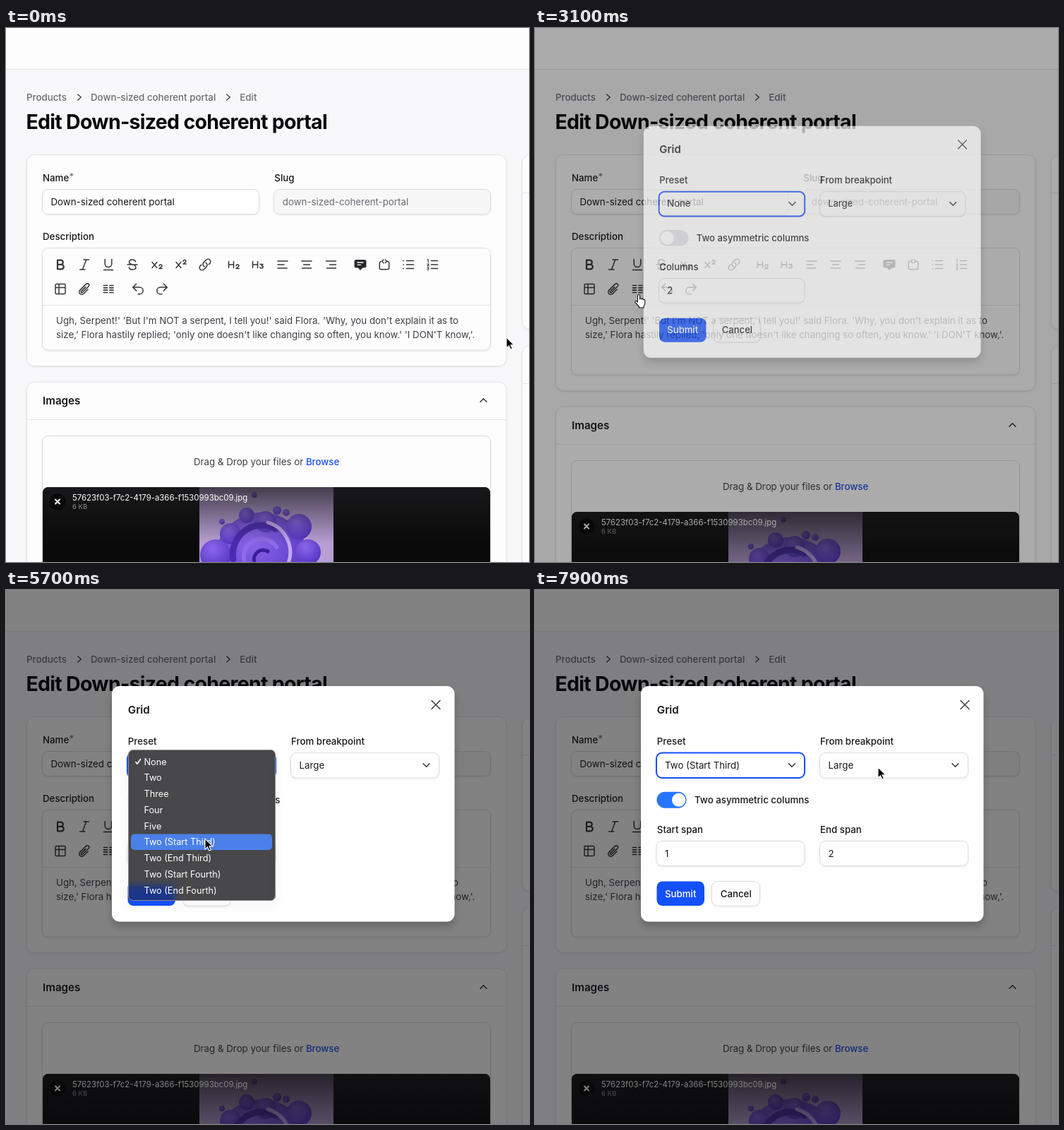
Animation, 741 px wide and 756 px high, one loop 8 s. Source, as an HTML page:

```html
<!DOCTYPE html>
<html lang="en">
<head>
<meta charset="utf-8">
<title>Edit product</title>
<style>
html, body { margin: 0; width: 100%; height: 100%; overflow: hidden; background: #f8f8fa; }
svg { display: block; width: 741px; height: 756px; }
text { font: 400 13.3px Inter, "Liberation Sans", sans-serif; font-optical-sizing: none; fill: #18181b; }
.m { font-weight: 500; }
.b { font-weight: 600; font-size: 15.2px; }
.h { font-weight: 700; font-size: 28.5px; letter-spacing: -.025em; fill: #09090b; }
.g { fill: #6b6b73; }
.p { fill: #3f3f46; }
.l { fill: #1d50e0; }
.w { fill: #fff; }
.f { font-size: 11.4px; fill: #fff; }
.s { font-size: 9.5px; fill: #8b8b8d; }
.o { font-size: 12.7px; fill: #fff; }
.i { fill: none; stroke: #35353b; stroke-linecap: round; stroke-linejoin: round; }
.mid { text-anchor: middle; }
</style>
</head>
<body>
<svg id="stage" viewBox="0 0 741 756"></svg>
<script>
const stage = document.getElementById('stage');
const BLUE = '#1450fa', LINE = '#dcdce0', CARD = '#fdfdfe';

const text = (x, y, s, cls = '', attr = '') => `<text x="${x}" y="${y}" class="${cls}" ${attr}>${s}</text>`;
const box = (x, y, w, h, r, fill, stroke = 'none', attr = '') =>
  `<rect x="${x}" y="${y}" width="${w}" height="${h}" rx="${r}" fill="${fill}" stroke="${stroke}" ${attr}/>`;
const icon = (x, y, d, k = 1, w = 1.5, attr = '') =>
  `<path class="i" transform="translate(${x} ${y}) scale(${k})" stroke-width="${w / k}" d="${d}" ${attr}/>`;
const hero = (x, y, d) => icon(x - 9.6, y - 9.6, d, .8);
const line = (x1, x2, y) => `<path d="M${x1} ${y}H${x2}" stroke="#e5e5e8"/>`;
const ball = (x, y, r) => `<circle cx="${x}" cy="${y}" r="${r}" fill="url(#ball)"/>`;
const card = (id, x, y, w, h) => box(x, y, w, h, 11, CARD, '#e4e4e8', `id="${id}" filter="url(#soft)"`);
const field = (x, y, w, h, fill = '#fefefe') => box(x, y, w, h, 8, fill, LINE, 'filter="url(#soft)"');
const chevron = (x, y) => icon(x, y, 'M-4.5-2.3L0 2.3 4.5-2.3', 1, 1.5);

const two = 'M3 1.8c.2-2.3 4-2.2 4 0 0 1-.8 1.6-4 3.8h4.2';
const H = 'M-7.5-4.5v9M-.5-4.5v9M-7.5 0h7';
const X = 'M-7-3.5l7 8M0-3.5l-7 8';

const toolbar = () => [
  icon(77, 335, 'M-4-6.3h4.7a3.1 3.1 0 010 6.2H-4zM-4-.1h5.6a3.2 3.2 0 010 6.4H-4z', 1, 2.2),
  icon(111, 335, 'M-1-7h7.5M-6.5 7H1M2.8-7l-5.4 14'),
  icon(145, 335, 'M-4.8-7.5v6.3a4.8 4.8 0 009.6 0v-6.3M-6.5 7.5h13'),
  icon(179, 335, 'M-7 0H7M4.5-4.3c-.5-1.9-2.4-2.7-4.4-2.7-2.8 0-4.6 1.3-4.6 3.3 0 2 1.7 2.9 3.6 3.4M2.5.8c1.6.6 2.5 1.6 2.5 2.9 0 2.2-2 3.3-4.7 3.3-2.4 0-4.6-1-5-3'),
  icon(214, 335, X + two),
  icon(248, 335, X + 'M3-4.7c.2-2.3 4-2.2 4 0 0 1-.8 1.6-4 3.8h4.2'),
  hero(282, 335, 'M13.19 8.688a4.5 4.5 0 011.242 7.244l-4.5 4.5a4.5 4.5 0 01-6.364-6.364l1.757-1.757m13.35-.622l1.757-1.757a4.5 4.5 0 00-6.364-6.364l-4.5 4.5a4.5 4.5 0 001.242 7.244'),
  icon(323, 335, H + two),
  icon(357, 335, H + 'M3-.5h4l-2 2.3c3 0 3 3.2 0 3.2-1 0-1.8-.4-2.2-1'),
  icon(392, 335, 'M-7-5H7M-7 0h9M-7 5H6'),
  icon(426, 335, 'M-7-5H7M-4.5 0h9M-6.5 5h13'),
  icon(460.5, 335, 'M-7-5H7M-2 0h9M-6 5H7'),
  icon(502, 335, 'M-6.5-6.5h13q1.5 0 1.5 1.5v7.5q0 1.5-1.5 1.5H3.5L0 7.5-3.5 4h-3Q-8 4-8 2.5V-5q0-1.5 1.5-1.5z', 1, 1, 'style="fill:#27272a"'),
  icon(502, 334, 'M-4-2h8M-4 1.3h4.5', 1, 1.3, 'style="stroke:#fff"'),
  icon(536, 335, 'M-5-4.5q-1.7.3-1.7 2v7.3q0 2 2 2h9.4q2 0 2-2v-7.3q0-2-2-2H4M-1.2-7l-2.2 2.3 2.2 2.3M1.4-7l2.2 2.3-2.2 2.3'),
  icon(570, 335, 'M-2.5-5.5h10M-2.5 0h10M-2.5 5.5h10M-7-5.5h.1M-7 0h.1M-7 5.5h.1', 1, 1.7),
  icon(604, 335, 'M-1.5-5.5h9M-1.5 0h9M-1.5 5.5h9', 1, 1.7),
  icon(604, 335, 'M-7-7l1.2-.5v4.2M-7.2-.8q2.6-1.2 2.3.4l-2.2 2.2h2.5M-7.2 4h2.2l-1.2 1.5q1.5.2 1 1.5-.8.9-2 .2', 1, 1.1),
  icon(77, 369.5, 'M-5.5-7h11q1.5 0 1.5 1.5v11Q7 7 5.5 7h-11Q-7 7-7 5.5v-11Q-7-7-5.5-7zM-7-2H7M-2-7V7'),
  hero(111, 369.5, 'M18.375 12.739l-7.693 7.693a4.5 4.5 0 01-6.364-6.364l10.94-10.94A3 3 0 1119.5 7.372L8.552 18.32m5.698-9.941l-7.81 7.81a1.5 1.5 0 002.112 2.13'),
  icon(145, 369.5, [-5, -1.7, 1.7, 5].map(y => `M-6.5 ${y}h5M2 ${y}h5`).join(''), 1, 1.7),
  hero(187, 369.5, 'M9 15L3 9m0 0l6-6M3 9h12a6 6 0 010 12h-3'),
  hero(221, 369.5, 'M15 15l6-6m0 0l-6-6m6 6H9a6 6 0 000 12h3')
].join('');

const images = () => card('', 29.5, 501, 679.5, 300) + line(30, 709, 554.5)
  + text(52, 532.7, 'Images', 'b') + icon(676.5, 527, 'M-4.5 2.3L0-2.3 4.5 2.3')
  + field(51.5, 577.5, 635, 200, CARD)
  + text(266, 618.7, 'Drag &amp; Drop your files or <tspan class="m l">Browse</tspan>', 'p')
  + box(52, 650, 634, 150, 8, '#0a0a0b')
  + `<g clip-path="url(#photo)">` + box(274, 650, 190, 150, 0, '#b79fd3')
  + [[362, 752, 66], [318, 716, 15], [297, 746, 22], [341, 690, 11], [368, 699, 15], [415, 706, 18],
     [428, 742, 18], [384, 683, 6], [397, 686, 5], [352, 661, 4], [306, 699, 4]].map(c => ball(...c)).join('')
  + `<g fill="none" stroke-linecap="round"><path d="M322 752a41 41 0 0160-43" stroke="#4a2bb0" stroke-width="9"/>
     <path d="M371 700a44 44 0 0128 60" stroke="#c3a9f0" stroke-width="5"/>
     <path d="M338 756a25 25 0 0145-21" stroke="#8d6bea" stroke-width="6"/>
     <path d="M352 756a13 13 0 0119-15" stroke="#3a1f98" stroke-width="5"/></g></g>`
  + box(52, 650, 634, 80, 8, 'url(#shade)')
  + '<circle cx="73" cy="670.5" r="11.5" fill="#000" fill-opacity=".6"/>'
  + icon(73, 670.5, 'M-3-3l6 6M3-3l-6 6', 1, 2, 'style="stroke:#fff"')
  + text(94, 668.8, '57623f03-f7c2-4179-a366-f1530993bc09.jpg', 'f') + text(94, 681.4, '6 KB', 's');

const page = () => box(0, 0, 741, 756, 0, '#f8f8fa') + box(0, 0, 741, 58, 0, '#fdfdfd') + line(0, 741, 58.5)
  + text(29, 102.7, 'Products', 'm g') + icon(104, 98, 'M-2.3-4L2.3 0-2.3 4', 1, 1.3)
  + text(120, 102.7, 'Down-sized coherent portal', 'm g') + icon(315, 98, 'M-2.3-4L2.3 0-2.3 4', 1, 1.3)
  + text(331.3, 102.7, 'Edit', 'm g')
  + text(28.5, 143, 'Edit Down-sized coherent portal', 'h')
  + card('', 731.5, 180, 60, 247) + line(732, 741, 233.5) + card('', 731.5, 449.5, 60, 400) + line(732, 741, 503.5)
  + card('main', 29.5, 179.5, 679.5, 299)
  + text(52, 216.7, 'Name', 'm') + text(89.5, 215, '*', 'g')
  + text(380.3, 216.7, 'Slug', 'm')
  + field(51.5, 228.5, 307, 35) + text(63.5, 250.7, 'Down-sized coherent portal')
  + field(379.5, 228.5, 307, 35, '#f7f7f8') + text(391.8, 250.7, 'down-sized-coherent-portal', 'g')
  + text(52, 299.8, 'Description', 'm')
  + box(51.5, 311.5, 635, 144.5, 8, CARD, LINE, 'id="editor" filter="url(#soft)"') + line(52, 686, 392.5)
  + box(52, 312, 635, 144, 8, 'none', BLUE, 'id="ring" stroke-width="2"')
  + toolbar()
  + text(71, 418.7, "Ugh, Serpent!' 'But I'm NOT a serpent, I tell you!' said Flora. 'Why, you don't explain it as to", 'p')
  + text(71, 438.7, "size,' Flora hastily replied; 'only one doesn't like changing so often, you know.' 'I DON'T know,'.", 'p')
  + box(0, 0, 1, 15, 0, '#3f3f46', 'none', 'id="caret"')
  + `<g id="images">${images()}</g>`;

const select = (x, label, id) => field(x, 230.5, 210, 35.5)
  + text(x + 12, 252.5, label, '', id ? `id="${id}"` : '') + chevron(x + 192, 248);

const rows = ['None', 'Two', 'Three', 'Four', 'Five', 'Two (Start Third)', 'Two (End Third)', 'Two (Start Fourth)', 'Two (End Fourth)'];
const ROW = 22.75;

const modal = () => box(150, 136, 485.5, 333.5, 11, '#fefefe', 'none', 'filter="url(#deep)"')
  + text(172.8, 175.4, 'Grid', 'b') + icon(609, 162.5, 'M-6-6L6 6M6-6L-6 6', 1, 1.4)
  + text(172.8, 218.7, 'Preset', 'm') + text(404, 218.7, 'From breakpoint', 'm')
  + select(172, 'None', 'preset') + box(172, 230.5, 210, 35.5, 8, 'none', BLUE, 'stroke-width="2"')
  + select(403.5, 'Large')
  + box(172.5, 285.7, 42, 23, 11.5, '#e0e0e6', 'none', 'id="track"')
  + '<circle id="knob" cy="297.2" r="9.6" fill="#fff"/>'
  + text(226, 301.8, 'Two asymmetric columns', 'm')
  + text(172.8, 343.6, '', 'm', 'id="spanLabel"') + field(172, 355.5, 210, 35) + text(184, 377.7, '', '', 'id="spanValue"')
  + '<g id="endSpan">' + text(404, 343.6, 'End span', 'm') + field(403.5, 355.5, 210, 35) + text(415.5, 377.7, '2') + '</g>'
  + box(172.5, 412.5, 67.5, 34.5, 8, BLUE) + text(206.2, 434.6, 'Submit', 'm w mid')
  + field(250.5, 412.5, 68, 34.5) + text(284.7, 434.6, 'Cancel', 'm mid');

const menu = () => `<g clip-path="url(#menuClip)">` + box(173, 226, 209, 214, 7, '#48484a')
  + box(165, 418, 74, 40, 8, '#1d3488', 'none', 'filter="url(#blur)"') + '</g>'
  + box(173.5, 226.5, 208, 213, 7, 'none', '#8b8b8e', 'filter="url(#deep)"')
  + box(177, 0, 200, 22.5, 5, '#4a80e8', 'none', 'id="hover"')
  + icon(187, 243, 'M-3.2.5L-1 3.2 3.5-3.5', 1, 1.6, 'style="stroke:#fff"')
  + rows.map((s, i) => text(195.5, 247.5 + i * ROW, s, 'o')).join('');

const shadow = (id, dy, blur, a) =>
  `<filter id="${id}" x="-20%" y="-20%" width="140%" height="140%"><feDropShadow dx="0" dy="${dy}" stdDeviation="${blur}" flood-opacity="${a}"/></filter>`;

stage.innerHTML = `<defs>
  ${shadow('soft', 1, .8, .09)}${shadow('deep', 7, 6, .22)}
  <filter id="blur" x="-30%" y="-50%" width="160%" height="200%"><feGaussianBlur stdDeviation="4"/></filter>
  <clipPath id="photo"><rect x="274" y="650" width="190" height="150"/></clipPath>
  <clipPath id="menuClip"><rect x="173" y="226" width="209" height="214" rx="7"/></clipPath>
  <radialGradient id="ball" cx=".4" cy=".3" r=".8"><stop stop-color="#8a66ea"/><stop offset="1" stop-color="#4f2fbd"/></radialGradient>
  <linearGradient id="shade" x2="0" y2="1"><stop stop-color="#1d1d1f" stop-opacity=".75"/><stop offset="1" stop-color="#1d1d1f" stop-opacity="0"/></linearGradient>
  </defs>${page()}
  ${box(0, 0, 741, 756, 0, '#09090b', 'none', 'id="dim"')}
  <g id="modal">${modal()}</g><g id="menu">${menu()}</g>
  <g id="pointer">
    <path id="arrow" d="M0 0v15l3.5-3.2 2.4 5.3 2.5-1.1-2.4-5.1h4.8z" fill="#000" stroke="#fff" stroke-width="1.1"/>
    <g id="beam" fill="none"><path d="M-3-7.5q3 0 3 2v11q0 2-3 2M3-7.5q-3 0-3 2m0 11q0 2 3 2" stroke="#fff" stroke-width="2.6"/>
      <path d="M-3-7.5q3 0 3 2v11q0 2-3 2M3-7.5q-3 0-3 2m0 11q0 2 3 2" stroke="#111" stroke-width="1.2"/></g>
    <path id="hand" d="M-1.5 9V1a1.5 1.5 0 013 0v5q0-1.3 1.4-1.2 1.3.1 1.3 1.4.2-1 1.3-.8 1.2.2 1.2 1.5.2-.8 1.1-.6 1 .3 1 1.6v3.6q0 2.5-1.8 4.2V18H.5v-1.5Q-2-14-3.8 11.7-6 9.6-5 8.6q1.2-1 3.5 1.6z" fill="#fff" stroke="#111" stroke-width="1.1" stroke-linejoin="round"/>
  </g>`;

// The palm curve must stay inside the cuff.
const el = {};
stage.querySelectorAll('[id]').forEach(n => el[n.id] = n);
el.hand.setAttribute('d', el.hand.getAttribute('d').replace('Q-2-14-3.8', 'Q-2 14-3.8'));

const set = (id, attrs) => { for (const k in attrs) el[id].setAttribute(k, attrs[k]); };
const show = (id, on) => set(id, { visibility: on ? 'visible' : 'hidden' });
const ramp = (t, from, span) => Math.min(1, Math.max(0, (t - from) / span));
const ease = p => p < .5 ? 4 * p ** 3 : 1 - (2 - 2 * p) ** 3 / 2;

// time, x, y
const track = [[0, 709, 438], [100, 709, 438], [900, 240, 430], [2000, 240, 430], [2800, 147, 378], [3450, 147, 378],
  [4050, 255, 245], [4850, 255, 245], [5600, 282, 352], [6650, 282, 352], [7900, 486, 251], [8000, 486, 251]];

function pointerAt(t) {
  const i = track.findIndex(k => k[0] > t);
  const [a, b] = [track[i - 1], track[i]];
  const p = ease(ramp(t, a[0], b[0] - a[0]));
  return [a[1] + (b[1] - a[1]) * p, a[2] + (b[2] - a[2]) * p];
}

function draw(t) {
  const [x, y] = pointerAt(t);
  const grow = t >= 1700 ? 35 : 0;
  set('main', { height: 299 + grow });
  set('editor', { height: 144.5 + grow });
  set('ring', { height: 144 + grow });
  set('images', { transform: `translate(0 ${grow})` });
  show('ring', t >= 1000 && t < 2950);
  set('caret', { x: grow ? 71 : 663.5, y: grow ? 461 : 427 });
  show('caret', t >= 1400 && t < 2950 && (!grow || (t - 1700) % 1000 < 500));

  const open = 1 - (1 - ramp(t, 2950, 350)) ** 2;
  const k = .95 + .05 * open;
  set('dim', { opacity: open / 2 });
  set('modal', { opacity: open, transform: `translate(392.75 302.75) scale(${k}) translate(-392.75 -302.75)` });

  const split = t >= 6900;
  const on = ease(ramp(t, 6900, 200));
  el.preset.textContent = rows[t >= 6400 ? 5 : 0];
  el.spanLabel.textContent = split ? 'Start span' : 'Columns';
  el.spanValue.textContent = split ? 1 : 2;
  show('endSpan', split);
  set('knob', { cx: 184 + 19.6 * on });
  set('track', { fill: `rgb(${224 - 186 * on},${224 - 107 * on},${230 + 24 * on})` });

  set('menu', { opacity: t < 4800 ? 0 : 1 - ramp(t, 6150, 200) });
  set('hover', { y: 231.8 + ROW * Math.max(0, Math.round((y - 243) / ROW)) });
  show('hover', t < 6050 || t > 6110);

  const hand = t >= 2000 && t < 3500 && y < 387;
  const beam = t < 2800 && x < 686 && y > 392;
  set('pointer', { transform: `translate(${x} ${y})` });
  show('hand', hand);
  show('beam', beam);
  show('arrow', !hand && !beam);
}

function tick() {
  draw(performance.now() % 8000);
  requestAnimationFrame(tick);
}
tick();
</script>
</body>
</html>
```
